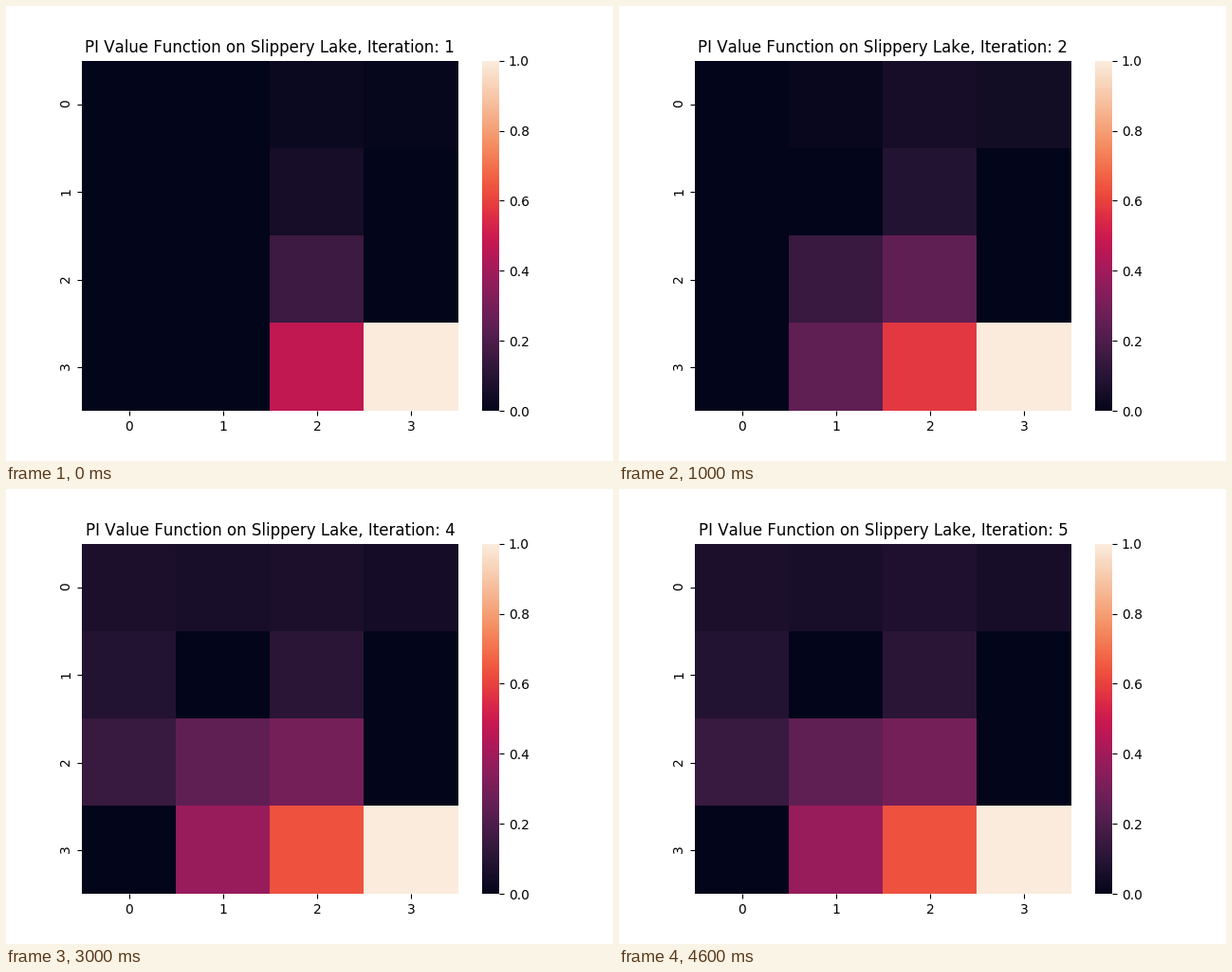
Animation of 640 by 480 pixels, one loop 5 s. Source, as a matplotlib script:

```python
import numpy as np
import matplotlib.pyplot as plt
from matplotlib.animation import FuncAnimation
from matplotlib.colors import ListedColormap, to_rgb

SIZE = 4
STATES = SIZE * SIZE
HOLES = (5, 7, 11, 12)
GOAL = STATES - 1
GAMMA = 0.9
ROUNDS = 5
MOVES = ((0, -1), (1, 0), (0, 1), (-1, 0))  # left, down, right, up
RAMP = "#03051A #30173A #611F53 #961C5B #CB1B4F #EC4C3E #F4875E #F6BC99 #FAEBDD"

# Unkerned text, cell edges left off the pixel grid
plt.rcParams.update({"text.kerning_factor": 6, "pcolormesh.snap": False})


def smooth_ramp(colours):
    """Cubic Hermite curve through evenly spaced colours."""
    y = np.array([to_rgb(c) for c in colours])
    slope = np.gradient(y, axis=0)
    pos = np.linspace(0, len(y) - 1, 256)
    i = np.minimum(pos.astype(int), len(y) - 2)
    t = (pos - i)[:, None]
    s = 1 - t
    rgb = (s * s * ((1 + 2 * t) * y[i] + t * slope[i])
           + t * t * ((1 + 2 * s) * y[i + 1] - s * slope[i + 1]))
    return ListedColormap(np.clip(rgb, 0, 1))


def step(state, move):
    cell = np.add(divmod(state, SIZE), MOVES[move % 4])
    row, col = np.clip(cell, 0, SIZE - 1)
    return row * SIZE + col


def transitions():
    """Each action slips to either side with equal chance."""
    p = np.zeros((STATES, 4, STATES))
    for s in range(STATES):
        if s in HOLES or s == GOAL:
            continue
        for a in range(4):
            for slip in (-1, 0, 1):
                p[s, a, step(s, a + slip)] += 1 / 3
    return p


def policy_iteration(rounds):
    p = transitions()
    reward = p[:, :, GOAL]
    every = np.arange(STATES)
    v = np.zeros(STATES)
    grids = []
    for _ in range(rounds):
        q = reward + GAMMA * p @ v
        policy = np.argmax(np.round(q, 10), axis=1)
        v = np.linalg.solve(np.eye(STATES) - GAMMA * p[every, policy],
                            reward[every, policy])
        shown = v.copy()
        shown[GOAL] = 1
        grids.append(shown.reshape(SIZE, SIZE))
    return grids


grids = policy_iteration(ROUNDS)

fig, ax = plt.subplots(figsize=(6.4, 4.8), dpi=100)
mesh = ax.pcolormesh(grids[0], cmap=smooth_ramp(RAMP.split()), vmin=0, vmax=1)
ax.set(xlim=(0, SIZE), ylim=(SIZE, 0))
ax.spines[:].set_visible(False)
bar = fig.colorbar(mesh, ax=ax)
bar.outline.set_linewidth(0)

centres = np.arange(SIZE) + 0.5
ax.set_xticks(centres, range(SIZE))
ax.set_yticks(centres, range(SIZE), rotation="vertical")
title = ax.set_title("")


def update(i):
    mesh.set_array(grids[i])
    title.set_text(f"PI Value Function on Slippery Lake, Iteration: {i + 1}")
    return mesh, title


anim = FuncAnimation(fig, update, frames=ROUNDS, interval=1000,
                     repeat=True, repeat_delay=0)
plt.show()
```
